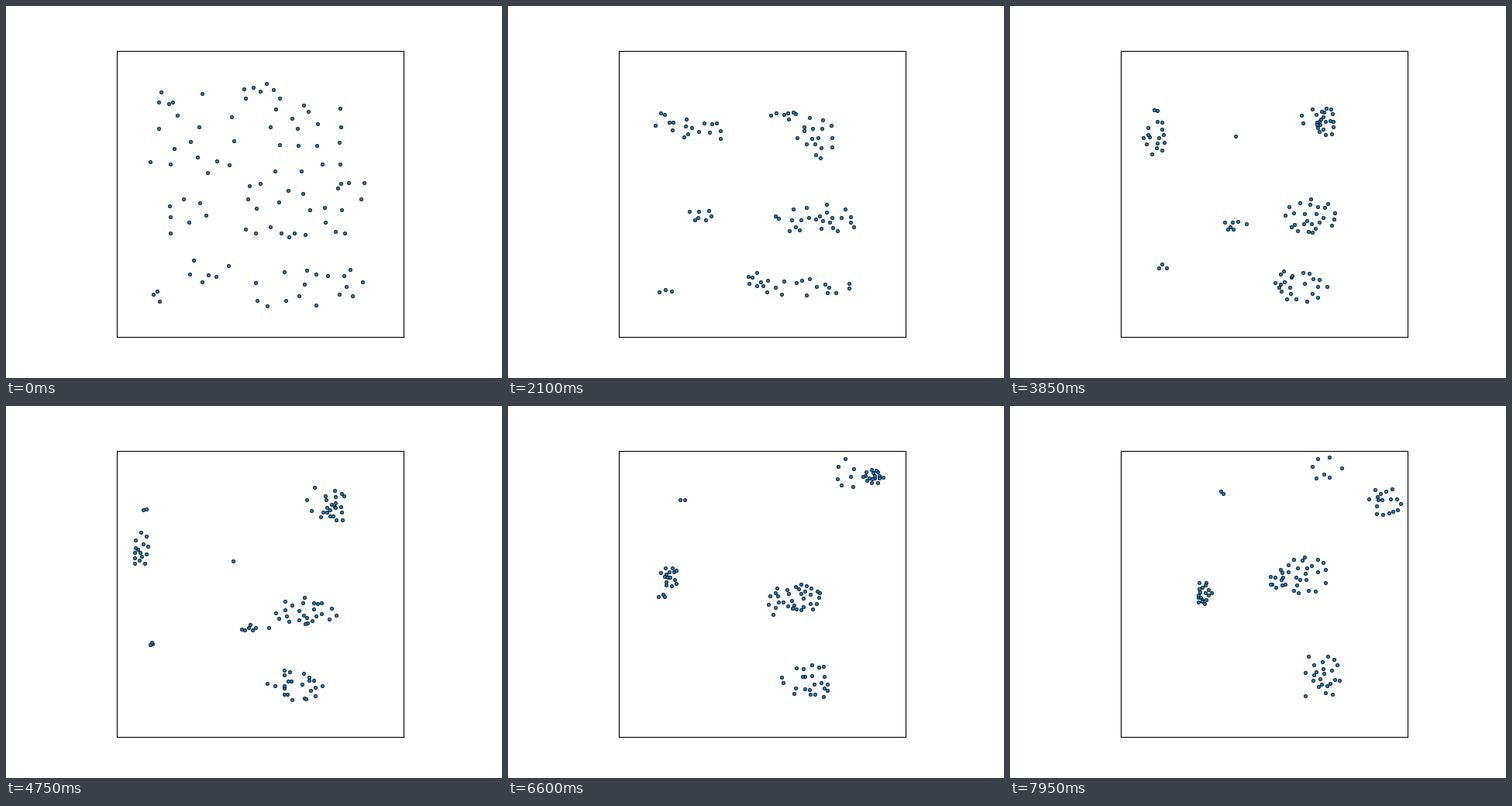
Animation, 640 px wide and 480 px high, one loop 8 s. Source, as a matplotlib script:

```python
import numpy as np
import matplotlib.pyplot as plt
from matplotlib.animation import FuncAnimation

W, H, DPI = 640, 480, 100
STEP, FRAMES = 50, 160
LEFT, RIGHT, TOP, BOTTOM = 143.2, 512.8, 57.6, 427.2
TIMES = np.array([0, 1250, 3000, 4750, 5850, 6600, 7950], float)

rng = np.random.default_rng(11)


def cloud(n, x, y, rx=3.5, ry=3.5, square=False):
    """n loosely spaced dots inside a box or an ellipse around (x, y)."""
    if n == 1:
        return np.array([[x, y]], float)
    dots = []
    while len(dots) < n:
        tries = rng.uniform(-1, 1, (40, 2))
        if not square:
            tries = tries[np.hypot(*tries.T) < 1]
        tries = tries[:4]
        if dots:
            scaled = (tries[:, None] - np.array(dots)) * [rx, ry]
            gaps = np.hypot(scaled[..., 0], scaled[..., 1]).min(1)
            tries = tries[gaps.argmax():]
        dots.append(tries[0])
    return np.array(dots) * [rx, ry] + [x, y]


def match(now, then):
    """Order the dots of then so that each dot of now has a short way."""
    cost = ((now[:, None] - then[None]) ** 2).sum(-1)
    order = np.arange(len(now))
    while True:
        c = cost[:, order]
        d = np.diag(c)
        gain = c + c.T - d[:, None] - d[None]
        i, j = np.unravel_index(gain.argmin(), gain.shape)
        if gain[i, j] > -1e-6:
            return then[order]
        order[[i, j]] = order[[j, i]]


def flock(n, *stops):
    """Dots of one flock at each time; a stop is x, y and half sizes."""
    keys = [cloud(n, *stops[0], square=True)]
    for stop in stops[1:]:
        keys.append(match(keys[-1], cloud(n, *stop)))
    return np.array(keys)


upper_left = flock(15, (240, 158, 58, 48), (246, 158, 60, 13),
                   (206, 160, 27, 23), (172, 184, 13, 24),
                   (188, 213, 14, 17), (208, 222, 13, 16),
                   (249, 239, 11, 13))
pair = flock(2, (200, 129, 12, 7), (194, 140, 8, 1), (202, 135), (178, 134),
             (199, 126), (225, 122), (274, 112))
loner = flock(1, (260, 215), (259, 198), (292, 150), (293, 200),
              (320, 231), (345, 241), (338, 230))
upper_mid = flock(7, (330, 109, 29, 12), (337, 120, 25, 4),
                  (382, 156, 19, 9), (405, 124, 20, 20),
                  (431, 108, 17, 24), (437, 85, 16, 22),
                  (408, 81, 24, 15))
upper_right = flock(17, (385, 170, 47, 45), (401, 172, 36, 40),
                    (397, 161, 17, 18), (425, 130, 15, 22),
                    (449, 100, 12, 14), (471, 91, 14, 9),
                    (484, 121, 21, 21))
mid_left = flock(7, (228, 273, 32, 27), (238, 268, 24, 9),
                 (267, 273, 17, 14), (321, 286, 18, 5),
                 (355, 262, 13, 13), (346, 254, 10, 20),
                 (344, 226, 9, 19))
mid_right = flock(25, (388, 265, 80, 38), (402, 272, 86, 12),
                  (390, 272, 34, 28), (387, 265, 42, 18),
                  (381, 256, 33, 20), (379, 247, 26, 18),
                  (380, 219, 35, 25))
trio = flock(3, (195, 378, 6, 11), (202, 371, 14, 1), (206, 358, 11, 6),
             (187, 306), (184, 268, 5, 2), (197, 245, 7, 2),
             (248, 252, 7, 4))
lower_left = flock(6, (260, 345, 27, 22), (291, 348, 14, 7),
                   (347, 358, 10, 17), (352, 358, 18, 20),
                   (355, 358, 14, 18), (368, 354, 19, 18),
                   (386, 354, 8, 32))
lower_right = flock(17, (394, 363, 76, 25), (394, 362, 82, 8),
                    (375, 361, 40, 24), (380, 361, 28, 22),
                    (388, 359, 20, 24), (396, 355, 21, 25),
                    (411, 350, 17, 29))

keys = np.concatenate([upper_left, pair, loner, upper_mid, upper_right,
                       mid_left, mid_right, trio, lower_left, lower_right],
                      axis=1)
speeds = np.gradient(keys, TIMES, axis=0)


def positions(ms):
    """Cubic Hermite path of every dot through its stops."""
    k = min(np.searchsorted(TIMES, ms, "right") - 1, len(TIMES) - 2)
    span = TIMES[k + 1] - TIMES[k]
    u = (ms - TIMES[k]) / span
    p = ((1 + 2 * u) * (1 - u) ** 2 * keys[k]
         + u * (1 - u) ** 2 * span * speeds[k]
         + u * u * (3 - 2 * u) * keys[k + 1]
         + u * u * (u - 1) * span * speeds[k + 1])
    return np.clip(p, [LEFT + 4, TOP + 4], [RIGHT - 6, BOTTOM - 4])


fig = plt.figure(figsize=(W / DPI, H / DPI), dpi=DPI, facecolor="white")
ax = fig.add_axes([LEFT / W, 1 - BOTTOM / H,
                   (RIGHT - LEFT) / W, (BOTTOM - TOP) / H])
ax.set(xlim=(LEFT, RIGHT), ylim=(BOTTOM, TOP), xticks=[], yticks=[])
start = positions(0)
swarm = ax.scatter(start[:, 0], start[:, 1], s=10, c="C0",
                   edgecolors="black", linewidths=0.5)


def draw(frame):
    swarm.set_offsets(positions(frame * STEP))
    return swarm,


anim = FuncAnimation(fig, draw, frames=FRAMES, interval=STEP,
                     repeat=True, repeat_delay=0, blit=False)
plt.show()
```
